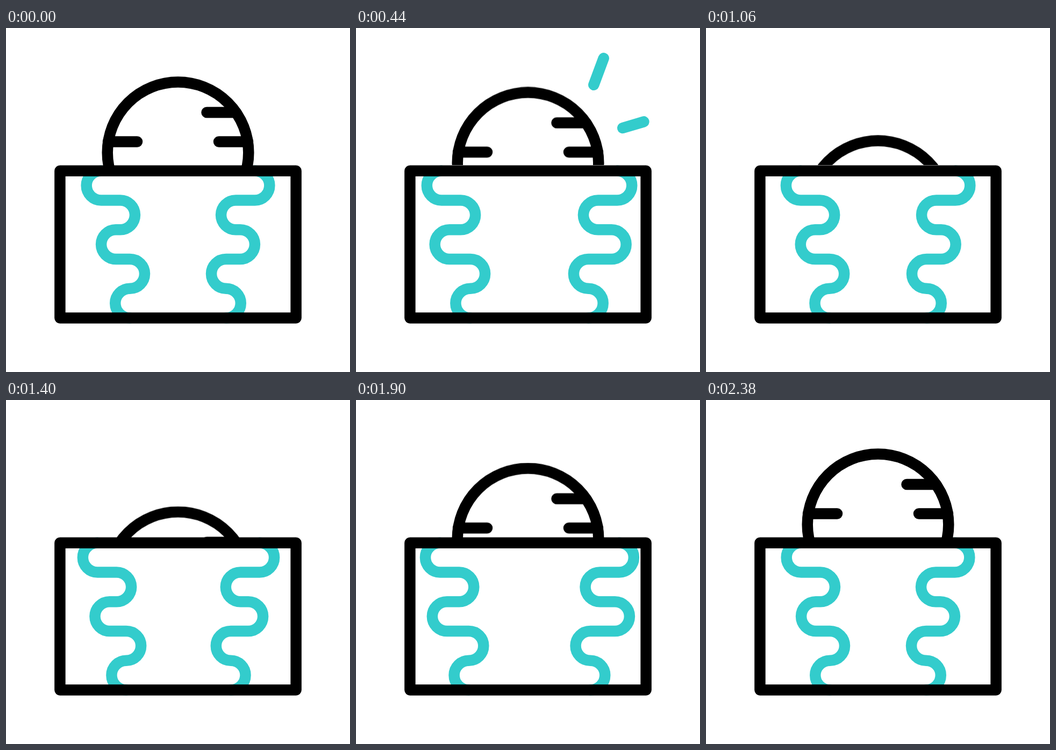
Write an HTML page without scripts that moves like this. It is 640 px wide and 640 px high and loops after 2400 ms.

```html
<!DOCTYPE html>
<html lang="en">
<head>
<meta charset="utf-8">
<title>Sunset</title>
<style>
  html, body { margin: 0; width: 100%; height: 100%; overflow: hidden; background: #fff; }
  svg { display: block; width: 100%; height: 100%; }
  svg * { fill: none; stroke-width: 20.5; stroke-linecap: round; stroke-linejoin: round; }
  .ink { stroke: #000; }
  .teal { stroke: #3cc; }

  .sun { animation: sink 2400ms cubic-bezier(.7, 0, .3, 1) infinite; }
  @keyframes sink {
    0%, 99.17%, 100% { transform: translateY(0); }
    50% { transform: translateY(110.4px); }
  }

  /* quick, even swing out; soft return */
  .wave {
    d: path("M177 265.7a27.37 27.37 0 0 0 0 54.74H212.6a27.37 27.37 0 0 1 0 54.74H204.4a27.37 27.37 0 0 0 0 54.74H230.6a27.37 27.37 0 0 1 0 54.74a27.37 27.37 0 0 0 0 54.74");
    animation: sway-left 2400ms cubic-bezier(.2, 0, .77, 1) infinite;
  }
  .right { animation-name: sway-right; }
  @keyframes sway-left {
    0%, 50%, 99.17%, 100% {
      d: path("M177 265.7a27.37 27.37 0 0 0 0 54.74H212.6a27.37 27.37 0 0 1 0 54.74H204.4a27.37 27.37 0 0 0 0 54.74H230.6a27.37 27.37 0 0 1 0 54.74a27.37 27.37 0 0 0 0 54.74");
    }
    25%, 75% {
      d: path("M154.7 265.7a27.37 27.37 0 0 0 0 54.74H190.3a27.37 27.37 0 0 1 0 54.74H166.4a27.37 27.37 0 0 0 0 54.74H208.3a27.37 27.37 0 0 1 0 54.74a27.37 27.37 0 0 0 0 54.74");
      animation-timing-function: cubic-bezier(.45, 0, .2, 1);
    }
  }
  @keyframes sway-right {
    0%, 50%, 99.17%, 100% {
      d: path("M177 265.7a27.37 27.37 0 0 0 0 54.74H212.6a27.37 27.37 0 0 1 0 54.74H204.4a27.37 27.37 0 0 0 0 54.74H230.6a27.37 27.37 0 0 1 0 54.74a27.37 27.37 0 0 0 0 54.74");
    }
    25%, 75% {
      d: path("M148.4 265.7a27.37 27.37 0 0 0 0 54.74H184a27.37 27.37 0 0 1 0 54.74H154.8a27.37 27.37 0 0 0 0 54.74H202a27.37 27.37 0 0 1 0 54.74a27.37 27.37 0 0 0 0 54.74");
      animation-timing-function: cubic-bezier(.45, 0, .2, 1);
    }
  }

  /* rays draw outwards, then leave outwards */
  .rays path { stroke-dasharray: 1 3; animation: shine-right 2400ms linear infinite; }
  .rays.early path { animation-name: shine-left; }
  @keyframes shine-right {
    0%, 12.5% { stroke-dashoffset: 1.1; }
    17.5%, 22.5% { stroke-dashoffset: 0; }
    27%, 100% { stroke-dashoffset: -1.1; }
  }
  @keyframes shine-left {
    0%, 2.5% { stroke-dashoffset: 1.1; }
    7.5%, 11% { stroke-dashoffset: 0; }
    16%, 100% { stroke-dashoffset: -1.1; }
  }
</style>
</head>
<body>
<svg viewBox="0 0 640 640">
  <clipPath id="sky"><path d="M0 0H640V255.2H0Z"/></clipPath>

  <g clip-path="url(#sky)">
    <g class="sun ink">
      <circle cx="320" cy="231.8" r="131.3"/>
      <path d="M373.5 157H427.9M190 211.6H244M396 211.6H450"/>
    </g>
  </g>

  <g class="rays teal">
    <path pathLength="1" d="M442.3 105.8L460.7 56.3"/>
    <path pathLength="1" d="M496.2 186L535.5 174.4"/>
  </g>
  <g class="rays early teal" transform="matrix(-1 0 0 1 631 0)">
    <path pathLength="1" d="M442.3 105.8L460.7 56.3"/>
    <path pathLength="1" d="M496.2 186L535.5 174.4"/>
  </g>

  <g class="teal">
    <path class="wave"/>
    <g transform="matrix(-1 0 0 1 640 0)"><path class="wave right"/></g>
  </g>
  <rect class="ink" x="100.4" y="265.7" width="439.2" height="273.7"/>
</svg>
</body>
</html>
```
